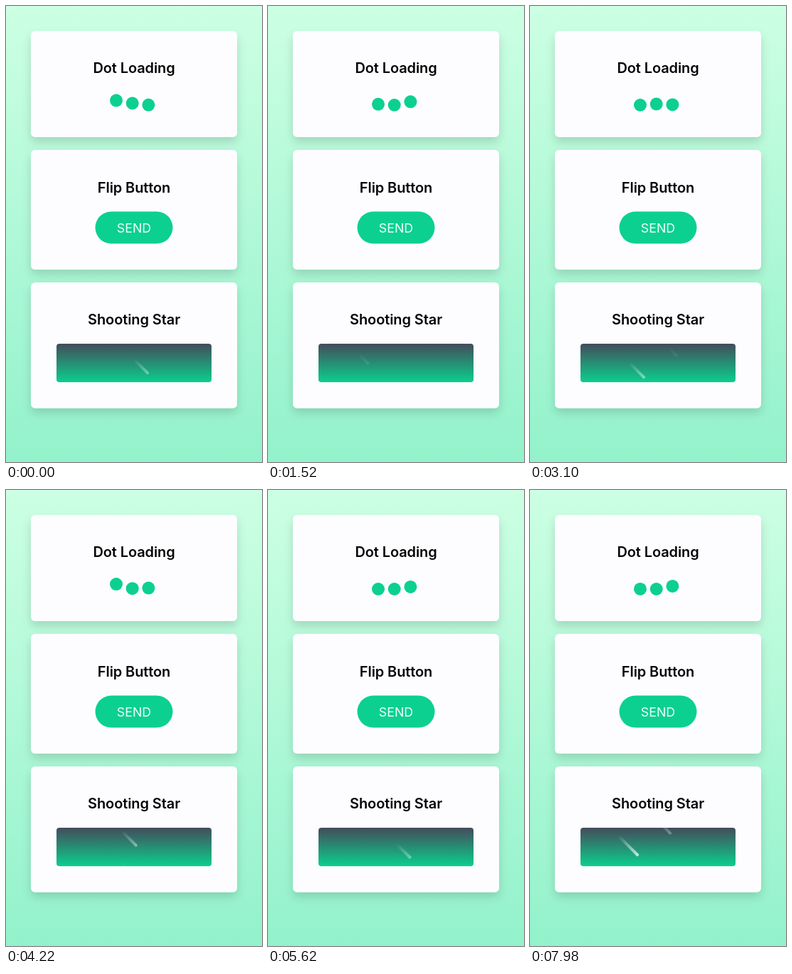
An HTML page for the animation above (8 s loop, 360 by 640 pixels).

```html
<!DOCTYPE html>
<html lang="en">
<head>
<meta charset="utf-8">
<title>Loading cards</title>
<style>
  html, body { margin: 0; width: 100%; height: 100%; overflow: hidden; background: #b0f8d8; }
  svg { display: block; width: 100vw; height: 100vh; }
  text { font-family: Inter, "Liberation Sans", sans-serif; text-anchor: middle; }
  .title { font-size: 20px; font-weight: 600; letter-spacing: -.1px; fill: #050505; }
  .label { font-size: 17.8px; fill: #ecfff8; }
</style>
</head>
<body>
<svg viewBox="0 0 360 640">
  <defs>
    <linearGradient id="page" x2="0" y2="1">
      <stop stop-color="#ccffe3"/>
      <stop offset="1" stop-color="#93f2cb"/>
    </linearGradient>
    <linearGradient id="sky" x2="0" y2="1">
      <stop stop-color="#434c5b"/>
      <stop offset="1" stop-color="#0bcf8d"/>
    </linearGradient>
    <linearGradient id="tail">
      <stop stop-color="#fff" stop-opacity="0"/>
      <stop offset="1" stop-color="#fff" stop-opacity=".75"/>
    </linearGradient>
    <filter id="shadow" x="-10%" y="-10%" width="120%" height="130%">
      <feDropShadow dx="0" dy="7" stdDeviation="6.5" flood-opacity=".14"/>
    </filter>
    <clipPath id="window"><rect x="71" y="474" width="218" height="54" rx="4"/></clipPath>
  </defs>

  <rect width="360" height="640" fill="url(#page)"/>
  <g fill="#fdfdff" filter="url(#shadow)">
    <rect x="35" y="35" width="290" height="149" rx="6"/>
    <rect x="35" y="202" width="290" height="168" rx="6"/>
    <rect x="35" y="388" width="290" height="176.5" rx="6"/>
  </g>

  <text class="title" x="180" y="94">Dot Loading</text>
  <g id="dots" fill="#0cd090"></g>

  <text class="title" x="180" y="261.5">Flip Button</text>
  <rect x="125.5" y="288.5" width="109" height="45" rx="22.5" fill="#0cd090"/>
  <text class="label" x="180" y="318">SEND</text>

  <text class="title" x="180" y="447">Shooting Star</text>
  <rect x="71" y="474" width="218" height="54" rx="4" fill="url(#sky)"/>
  <g id="stars" clip-path="url(#window)"></g>
</svg>
<script>
const LOOP = 8000, DOT_CYCLE = 47.5, STAR_CYCLE = 120, SPEED = .56;

// peak: step of the highest point; lift: height in px
const dots = [
  { x: 155, peak: -3, lift: 7 },
  { x: 177.7, peak: 8.5, lift: 5 },
  { x: 200.4, peak: 32.7, lift: 4.7 }
];
// head position at step "at"; the star has faded out at step "end"
const stars = [
  { x: 149.5, y: 510.5, at: 46, end: 99 },
  { x: 184, y: 500, at: 91, end: 148 },
  { x: 195.5, y: 480, at: 46, end: 74 }
];

function add(parent, tag, attrs) {
  const el = document.createElementNS("http://www.w3.org/2000/svg", tag);
  for (const key in attrs) el.setAttribute(key, attrs[key]);
  return document.getElementById(parent).appendChild(el);
}
const mod = (a, b) => (a % b + b) % b;

for (const d of dots) d.el = add("dots", "circle", { cx: d.x, r: 9 });
for (const s of stars)
  s.el = add("stars", "rect", { x: -39, y: -2, width: 39, height: 4, rx: 1.5, fill: "url(#tail)" });

// Steps last 100, 20 and 20 ms in turn
function stepAt(t) {
  const r = (t + 120) % 140;
  return 3 * Math.floor((t + 120) / 140) - 2 + (r >= 120 ? 2 : r >= 100 ? 1 : 0);
}

function bump(distance) {
  return Math.abs(distance) < 17 ? Math.cos(distance * Math.PI / 34) ** 2 : 0;
}

function glow(left) {
  return left > 48 ? Math.max(0, (70 - left) / 22) : (left / 48) ** 1.2;
}

function draw(t) {
  const step = stepAt(t);
  for (const d of dots) {
    const off = mod(step - d.peak + DOT_CYCLE / 2, DOT_CYCLE) - DOT_CYCLE / 2;
    d.el.setAttribute("cy", 139 - d.lift * bump(off));
  }
  for (const s of stars) {
    const left = mod(s.end - step, STAR_CYCLE);
    const move = (s.end - left - s.at) * SPEED;
    const light = glow(left);
    s.el.setAttribute("transform",
      `translate(${s.x + move} ${s.y + move}) rotate(45) scale(${.45 + .55 * light} 1)`);
    s.el.setAttribute("opacity", light);
  }
}

const start = performance.now();
function tick() {
  draw((performance.now() - start) % LOOP);
  requestAnimationFrame(tick);
}
draw(0);
requestAnimationFrame(tick);
</script>
</body>
</html>
```
